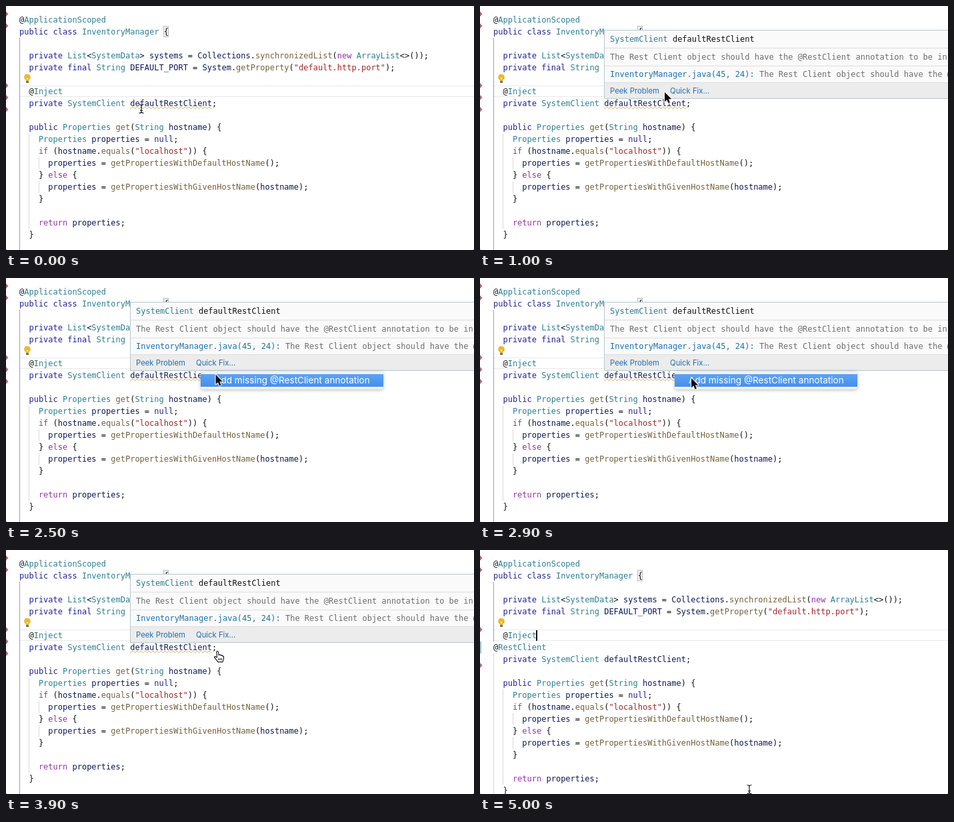
Recreate the animation shown at these times as an HTML page with a canvas. Size 702x368 px, loop 5100 ms.

```html
<!DOCTYPE html>
<html lang="en">
<head>
<meta charset="utf-8">
<title>Quick fix in a code editor</title>
<style>
  html, body { margin: 0; width: 100%; height: 100%; overflow: hidden; background: #fff; }
  canvas { display: block; width: 702px; height: 368px; }
</style>
</head>
<body>
<canvas id="stage" width="702" height="368"></canvas>
<script>
const ctx = document.getElementById('stage').getContext('2d');
const W = 702, H = 368, LOOP = 5100, STEP = 100;
const LEFT = 20, LINE = 18, FIRST_BASELINE = 25;
const MONO = '12px "DejaVu Sans Mono", monospace';
const LINK = '11.3px Inter, sans-serif';
const MENU = '13.6px Inter, sans-serif';

const COLOR = {
  plain: '#111', keyword: '#22229a', control: '#9a2fb0', type: '#2c7f92',
  call: '#75603a', string: '#a3262a', name: '#0c1858', link: '#1f70ae', muted: '#6d6d6d'
};

const CODE = [
  '@ApplicationScoped',
  'public class InventoryManager {',
  '',
  '  private List<SystemData> systems = Collections.synchronizedList(new ArrayList<>());',
  '  private final String DEFAULT_PORT = System.getProperty("default.http.port");',
  '',
  '  @Inject',
  '  private SystemClient defaultRestClient;',
  '',
  '  public Properties get(String hostname) {',
  '    Properties properties = null;',
  '    if (hostname.equals("localhost")) {',
  '      properties = getPropertiesWithDefaultHostName();',
  '    } else {',
  '      properties = getPropertiesWithGivenHostName(hostname);',
  '    }',
  '',
  '    return properties;',
  '  }'
];
const INJECT_LINE = 6;
const FIXED_CODE = [...CODE.slice(0, 7), '@RestClient', ...CODE.slice(7)];

// Timeline in ms
const HOVER = 400, OVER_LINK = 1100, MENU_OPEN = 1600, MENU_CLOSE = 3700, FIXED = 4000, LEAVE = 4200;
const CLICKS = [[1400, 1600], [3300, 3700]];
const PATH = [
  [0, 203, 155], [400, 203, 155], [1000, 277, 130], [1200, 305, 126], [1800, 305, 125],
  [2000, 305, 125], [2700, 317, 151], [3700, 317, 152], [4200, 317, 153], [5000, 404, 361]
];

const within = (t, from, to) => t >= from && t < to;

function rect(x, y, w, h, color) {
  ctx.fillStyle = color;
  ctx.fillRect(x, y, w, h);
}

function text(str, x, y, color, font = MONO) {
  ctx.font = font;
  ctx.fillStyle = color;
  ctx.fillText(str, x, y);
  return x + ctx.measureText(str).width;
}

function polygon(points) {
  ctx.beginPath();
  points.forEach(([x, y]) => ctx.lineTo(x, y));
  ctx.closePath();
}

function tokenColor(token, next) {
  if (token[0] === '"') return COLOR.string;
  if (/^(if|else|return|new)$/.test(token)) return COLOR.control;
  if (/^(public|private|final|class|null)$/.test(token)) return COLOR.keyword;
  if (/^[A-Z]\w*[a-z]/.test(token) && next !== '.') return COLOR.type;
  if (/^\w/.test(token)) return next === '(' ? COLOR.call : COLOR.name;
  return COLOR.plain;
}

function codeLine(line, y) {
  let x = LEFT;
  for (const match of line.matchAll(/"[^"]*"|\w+|[^\w"]+/g)) {
    const token = match[0];
    x = text(token, x, y, tokenColor(token, line[match.index + token.length]));
  }
}

function gutter(fixed) {
  for (const y of fixed ? [12, 30, 120, 174] : [12, 30, 120, 138, 156]) {
    ctx.fillStyle = '#b0687c';
    polygon([[0, y - 4], [3.5, y], [0, y + 4]]);
    ctx.fill();
  }
  if (fixed) rect(0, 138, 2, 18, '#9fc3d6');
}

function guides(fixed) {
  const shift = fixed ? LINE : 0;
  if (fixed) {
    rect(20, 48, 1, 90, '#a0a0a0');
    rect(20, 156, 1, H - 156, '#d8d8d8');
  } else {
    rect(20, 48, 1, H - 48, '#a0a0a0');
  }
  rect(34, 192 + shift, 1, 144, '#d8d8d8');
  rect(49, 228 + shift, 1, 18, '#d8d8d8');
  rect(49, 264 + shift, 1, 18, '#d8d8d8');
}

function bulb() {
  ctx.fillStyle = '#edb52f';
  ctx.beginPath();
  ctx.arc(32, 107.5, 4.8, 0, Math.PI * 2);
  ctx.fill();
  rect(30, 111, 4, 2, '#edb52f');
  rect(30, 113, 4, 3, '#77736a');
  rect(31.2, 108, 1.6, 3, '#fff2c4');
}

function squiggle() {
  ctx.strokeStyle = '#c9a548';
  ctx.lineWidth = 1;
  ctx.beginPath();
  for (let x = 186; x <= 309; x++) ctx.lineTo(x, 153.5 + 1.2 * Math.sin((x - 186) * Math.PI / 3));
  ctx.stroke();
}

function editor(fixed) {
  rect(0, 0, W, H, '#fff');
  rect(LEFT, 120, W - LEFT, 1, '#e9e9e9');
  rect(LEFT, 136, W - LEFT, 1, '#e9e9e9');
  guides(fixed);
  gutter(fixed);
  rect(237, 31, 7, 16, '#f1f1f1');
  ctx.strokeStyle = '#bcbcbc';
  ctx.lineWidth = 1;
  ctx.strokeRect(236.5, 30.5, 7, 16);
  (fixed ? FIXED_CODE : CODE).forEach((line, i) => codeLine(line, FIRST_BASELINE + i * LINE));
  bulb();
  if (!fixed) squiggle();
}

function hoverCard() {
  rect(187, 37, W, 103, '#fafafa');
  rect(187, 116, W, 23, '#ececec');
  for (const y of [63, 90, 115]) rect(187, y, W, 1, '#dedede');
  ctx.strokeStyle = '#b5c6d0';
  ctx.lineWidth = 1;
  ctx.strokeRect(186.5, 36.5, W, 103);

  const message = 'The Rest Client object should have the @RestClient annotation to be injected';
  const x = text('SystemClient', 195, 54, COLOR.type);
  text(' defaultRestClient', x, 54, COLOR.plain);
  text(message, 195, 81, COLOR.muted);
  const end = text('InventoryManager.java(45, 24): ', 195, 107, COLOR.link);
  text(message, end, 107, COLOR.muted);
  text('Peek Problem', 195, 132, COLOR.link, LINK);
  text('Quick Fix...', 285, 132, COLOR.link, LINK);
}

function fixMenu() {
  ctx.save();
  ctx.shadowColor = 'rgba(0,0,0,.28)';
  ctx.shadowBlur = 5;
  ctx.shadowOffsetY = 1;
  ctx.fillStyle = '#f1f1f1';
  ctx.beginPath();
  ctx.roundRect(292, 141, 274, 27, 4);
  ctx.fill();
  ctx.restore();
  const blue = ctx.createLinearGradient(0, 145, 0, 164);
  blue.addColorStop(0, '#5ca4f3');
  blue.addColorStop(1, '#468fee');
  rect(292, 145, 274, 19, blue);
  text('Add missing @RestClient annotation', 313, 159, '#fff', MENU);
}

function ring(x, y) {
  ctx.strokeStyle = '#161616';
  ctx.lineWidth = 1.6;
  ctx.beginPath();
  ctx.arc(x, y, 21.3, 0, Math.PI * 2);
  ctx.stroke();
}

const POINTERS = {
  beam() {
    ctx.strokeStyle = '#111';
    ctx.lineWidth = 1.2;
    ctx.beginPath();
    for (const s of [-1, 1]) {
      ctx.moveTo(-3.5, 6.5 * s);
      ctx.quadraticCurveTo(0, 6.5 * s, 0, 4.5 * s);
      ctx.quadraticCurveTo(0, 6.5 * s, 3.5, 6.5 * s);
    }
    ctx.moveTo(0, -5);
    ctx.lineTo(0, 5);
    ctx.moveTo(-2, 2.5);
    ctx.lineTo(2, 2.5);
    ctx.stroke();
  },
  arrow() {
    polygon([[0, 0], [0, 14.5], [3.3, 11.4], [5.6, 16.6], [8, 15.6], [5.8, 10.5], [10.3, 10.3]]);
    ctx.lineJoin = 'round';
    ctx.strokeStyle = '#fff';
    ctx.lineWidth = 2;
    ctx.stroke();
    ctx.fillStyle = '#0b0b0b';
    ctx.fill();
  },
  hand() {
    polygon([[-1.2, 1], [0, 0], [1.5, 1], [2, 6], [4, 5.4], [5, 6.5], [7, 6.3], [7.8, 7.5],
             [9.5, 8], [9.5, 12], [8, 16.5], [1, 16.5], [-2, 12.5], [-4.5, 9.5], [-3.5, 8], [-0.6, 9.8]]);
    ctx.lineJoin = 'round';
    ctx.fillStyle = '#fff';
    ctx.fill();
    ctx.strokeStyle = '#111';
    ctx.lineWidth = 1.1;
    ctx.stroke();
    ctx.beginPath();
    for (const x of [2, 4.3, 6.6]) {
      ctx.moveTo(x, 11);
      ctx.lineTo(x, 14);
    }
    ctx.stroke();
  }
};

function pointerAt(t) {
  const i = PATH.findIndex(([time]) => time > t);
  if (i < 0) return PATH.at(-1).slice(1);
  const [t0, x0, y0] = PATH[i - 1], [t1, x1, y1] = PATH[i];
  const u = (t - t0) / (t1 - t0), k = u * u * (3 - 2 * u);
  return [x0 + (x1 - x0) * k, y0 + (y1 - y0) * k];
}

function pointerKind(t) {
  if (t < HOVER || t >= LEAVE) return 'beam';
  if (within(t, OVER_LINK, MENU_OPEN) || t >= MENU_CLOSE) return 'hand';
  return 'arrow';
}

function corners() {
  ctx.fillStyle = '#c4c4c4';
  ctx.beginPath();
  ctx.rect(0, H - 3, W, 3);
  ctx.roundRect(0, H - 12, W, 12, 3);
  ctx.save();
  ctx.clip('evenodd');
  ctx.fillRect(0, H - 3, 3, 3);
  ctx.fillRect(W - 3, H - 3, 3, 3);
  ctx.restore();
}

function draw(t) {
  const fixed = t >= FIXED;
  editor(fixed);
  corners();
  if (fixed && (t - FIXED) % 1000 < 500) rect(84, 121, 2, 16, '#111');
  if (within(t, HOVER, FIXED)) hoverCard();
  if (within(t, MENU_OPEN, MENU_CLOSE)) fixMenu();

  const [x, y] = pointerAt(t);
  if (CLICKS.some(([from, to]) => within(t, from, to))) ring(x, y + 1);
  ctx.save();
  ctx.translate(x, y);
  POINTERS[pointerKind(t)]();
  ctx.restore();
}

const start = performance.now();
function tick() {
  const t = (performance.now() - start) % LOOP;
  draw(Math.floor(t / STEP) * STEP);
  requestAnimationFrame(tick);
}
tick();
</script>
</body>
</html>
```
